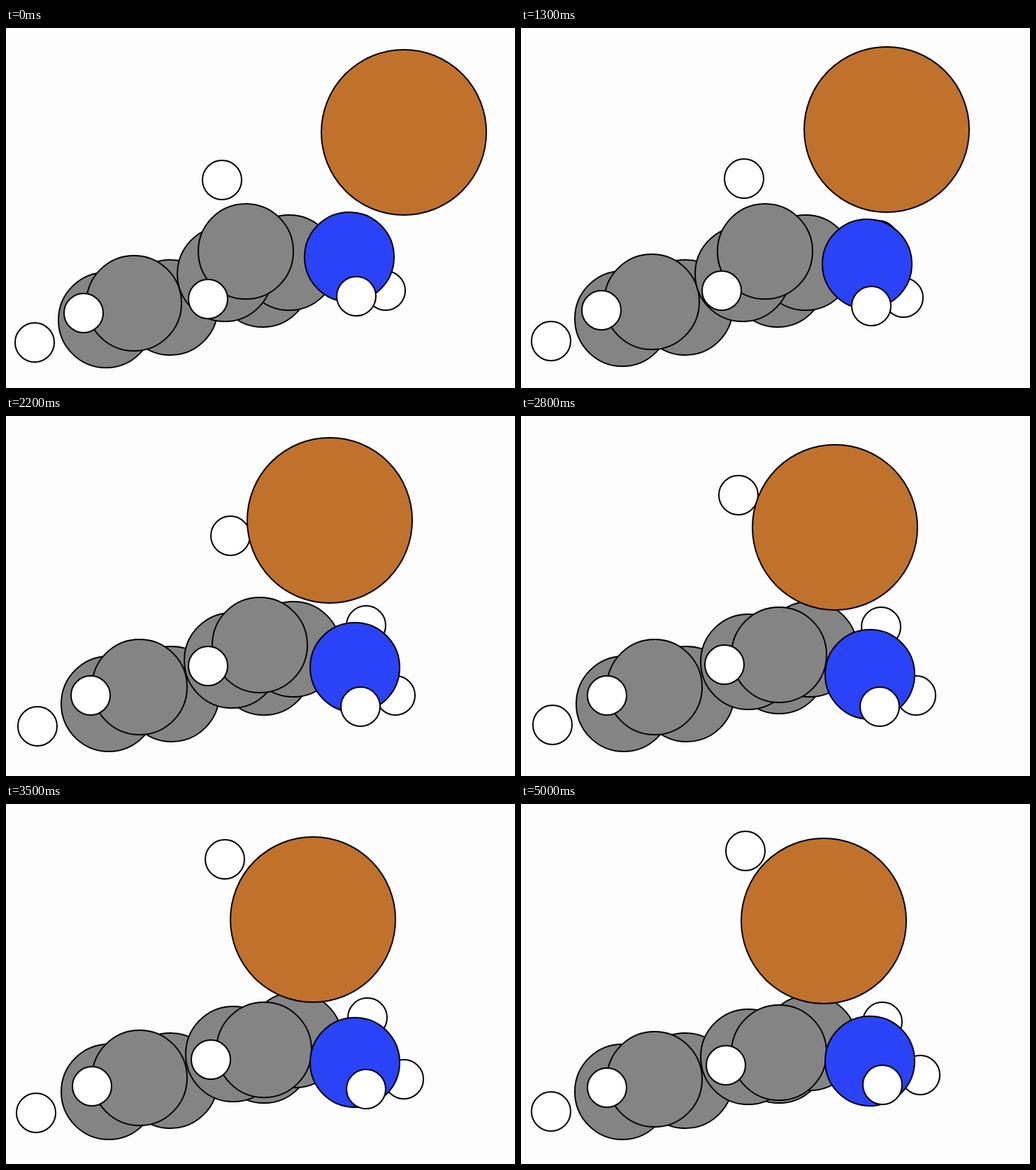
Recreate the animation shown at these times as an HTML page. Size 728 by 514 pixels, loop 5100 ms.

```html
<!DOCTYPE html>
<html lang="en">
<head>
<meta charset="utf-8">
<title>Molecule</title>
<style>
html, body { margin: 0; width: 100%; height: 100%; overflow: hidden; background: #fdfdfd; }
svg { display: block; width: 728px; height: 514px; }
circle { stroke: #000; stroke-width: 2; }
</style>
</head>
<body>
<svg id="stage" viewBox="0 0 728 514"></svg>
<script>
const STEP = 100, STEPS = 51;
const CARBON = { r: 68, fill: '#848484' }, NITROGEN = { r: 64, fill: '#2a43f8' };
const HEAVY = { r: 118, fill: '#c0722c' }, HYDROGEN = { r: 28, fill: '#fff' };

// Three overlapping phases, each running from 0 to 1 and shared by all atoms.
const settle = (start, span, power) => s =>
  1 - Math.exp(-((Math.max(0, s - start) / span) ** power));
const phases = {
  near: settle(0, 16.8, 2.85),    // the heavy atom approaches
  swap: settle(16.5, 10.62, 1.65), // a hydrogen changes sides
  relax: settle(24, 11, 1.5)       // the chain settles
};

const stage = document.getElementById('stage');
const balls = [];

// Added from back to front; shift gives the [dx, dy] made in each phase.
function ball(kind, x, y, shift) {
  const el = document.createElementNS('http://www.w3.org/2000/svg', 'circle');
  el.setAttribute('r', kind.r);
  el.setAttribute('fill', kind.fill);
  stage.append(el);
  balls.push({ el, x, y, shift: Object.entries(shift) });
}

// left group
ball(HYDROGEN, 41, 449, { near: [4, -7], relax: [-2, -3] });
ball(CARBON, 235, 399, { near: [1.5, -2], relax: [-1.5, -2] });
ball(CARBON, 143, 417, { near: [4, -6], relax: [-1.5, 0] });
ball(CARBON, 183, 393, { near: [8, -7], relax: [0, 7] });
ball(HYDROGEN, 111, 407, { near: [11, -9], relax: [1, 7] });

// middle group
ball(CARBON, 367, 359, { near: [1.2, 0], swap: [0, -3], relax: [0, 3] });
ball(CARBON, 405, 335, { near: [7.8, 0], swap: [0, -5], relax: [0, 11] });
ball(CARBON, 313, 351, { near: [12, 0], swap: [0, -4], relax: [0, 14] });
ball(CARBON, 343, 319, { near: [18, 0], swap: [12, 30], relax: [-4, 6] });
ball(HYDROGEN, 289, 387, { near: [-3, -31], swap: [7, -10], relax: [0, 28] });

// right group
ball(HYDROGEN, 507, 305, { near: [8, -5], swap: [0, -4], relax: [2, 15] });
ball(HYDROGEN, 543, 375, { near: [10, 28], swap: [18, 0], relax: [0, -16] });
ball(NITROGEN, 491, 327, { near: [8, 28], swap: [0, 24], relax: [0, -12] });
ball(HYDROGEN, 501, 383, { near: [2, 36], swap: [14, 0], relax: [0, -18] });

// the heavy atom and the hydrogen it takes
ball(HYDROGEN, 309, 217, { near: [28, -4], swap: [-46, -146], relax: [30, 0] });
ball(HEAVY, 569, 149, { near: [-119, -10], swap: [0, 28], relax: [-17, 0] });

const snap = v => 2 * Math.round((v - 1) / 2) + 1; // centres sit on odd pixels

function draw(ms) {
  const s = Math.floor(ms / STEP) % STEPS;
  for (const b of balls) {
    let { x, y } = b;
    for (const [name, [dx, dy]] of b.shift) {
      const p = phases[name](s);
      x += dx * p;
      y += dy * p;
    }
    b.el.setAttribute('cx', snap(x));
    b.el.setAttribute('cy', snap(y));
  }
}

const start = performance.now();
function tick() {
  draw(performance.now() - start);
  requestAnimationFrame(tick);
}
tick();
</script>
</body>
</html>
```
